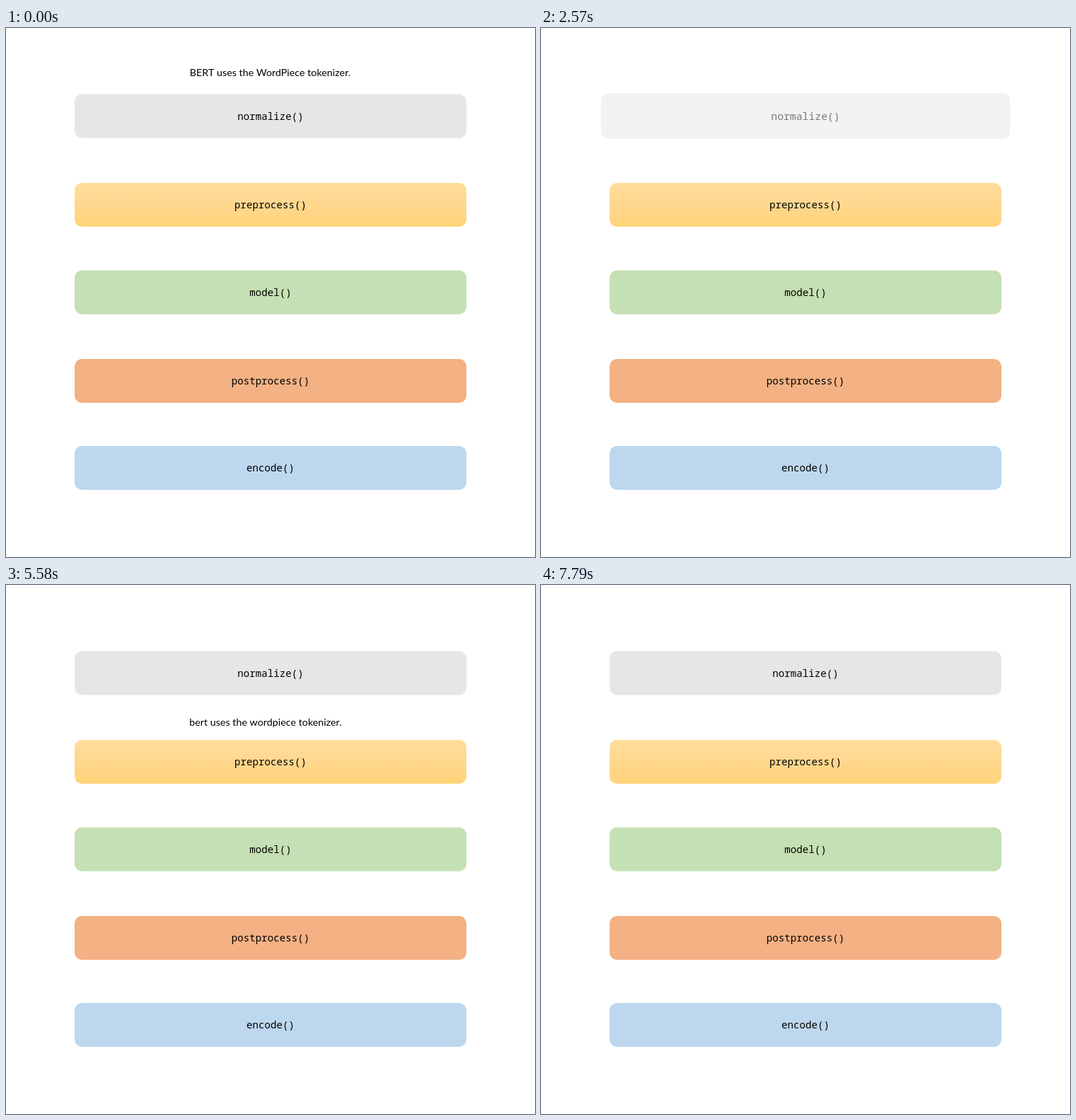
An HTML page with a canvas that plays this animation: 748x748 px, repeating every 8000 ms.

```html
<!DOCTYPE html>
<html lang="en">
<head>
<meta charset="utf-8">
<title>Tokenizer pipeline</title>
<style>
html, body { margin: 0; width: 100%; height: 100%; overflow: hidden; background: #fff; }
canvas { display: block; }
</style>
</head>
<body>
<canvas id="stage" width="748" height="748"></canvas>
<script>
const ctx = document.getElementById('stage').getContext('2d');
const LOOP = 8000, STEP = 40;
const LEFT = 97, WIDTH = 554, HEIGHT = 62, RADIUS = 10.3;
const SENTENCE_FONT = '14.3px Lato, Carlito, sans-serif';
const CODE_FONT = '14.15px "Noto Sans Mono", "DejaVu Sans Mono", monospace';

const stages = [
  { label: 'normalize()', y: 93.5, fill: ['#e6e6e6'], pulse: 2330 },
  { label: 'preprocess()', y: 219, fill: ['#ffdd9c', '#ffd78e', '#ffd479'], pulse: 7310 },
  { label: 'model()', y: 342.8, fill: ['#c5e0b4'] },
  { label: 'postprocess()', y: 468, fill: ['#f4b183'] },
  { label: 'encode()', y: 591, fill: ['#bdd7ee'] }
];

const clamp = v => Math.min(1, Math.max(0, v));
const hold = (t, start) => start + Math.floor((t - start) / STEP) * STEP;
const curve = (dt, rate) => Math.pow(Math.max(0, dt) * rate, 2.45);

// Grow by 5% and back over 500 ms, half transparent in the middle.
function pulseAt(t, start) {
  if (start === undefined || t < start || t >= start + 480) return { scale: 1, alpha: 1 };
  const p = (hold(t, start) - start + 38) / 500;
  return {
    scale: 1 + 0.05 * (1 - Math.abs(2 * p - 1)),
    alpha: 1 - 0.5 * clamp(Math.min(p, 1 - p) / 0.2)
  };
}

function paint(colors) {
  const g = ctx.createLinearGradient(0, -HEIGHT / 2, 0, HEIGHT / 2);
  colors.forEach((c, i) => g.addColorStop(i / Math.max(1, colors.length - 1), c));
  return g;
}

function drawStage(s, t) {
  const { scale, alpha } = pulseAt(t, s.pulse);
  ctx.save();
  ctx.translate(LEFT + WIDTH / 2, s.y + HEIGHT / 2);
  ctx.scale(scale, scale);
  ctx.globalAlpha = alpha;
  ctx.fillStyle = paint(s.fill);
  ctx.beginPath();
  ctx.roundRect(-WIDTH / 2, -HEIGHT / 2, WIDTH, HEIGHT, RADIUS);
  ctx.fill();
  ctx.fillStyle = '#000';
  ctx.font = CODE_FONT;
  ctx.textAlign = 'center';
  ctx.fillText(s.label, 0, 5.3);
  ctx.restore();
}

function drawSentence(text, x, y) {
  ctx.fillStyle = '#000';
  ctx.font = SENTENCE_FONT;
  ctx.textAlign = 'left';
  ctx.fillText(text, x, y);
}

function drawSentences(t) {
  if (t < 1200) {
    drawSentence('BERT uses the WordPiece tokenizer.', 259.8, 68 + curve(hold(t, 0) - 90, 0.004));
  } else if (t >= 3900 && t < 6140) {
    const now = hold(t, 3900);
    const y = 195.5 - curve(5190 - now, 0.0035) + curve(now - 5240, 0.0048);
    drawSentence('bert uses the wordpiece tokenizer.', 259.2, y);
  }
}

function frame(now) {
  const t = now % LOOP;
  ctx.fillStyle = '#fff';
  ctx.fillRect(0, 0, 748, 748);
  drawSentences(t);
  stages.forEach(s => drawStage(s, t));
  requestAnimationFrame(frame);
}
requestAnimationFrame(frame);
</script>
</body>
</html>
```
